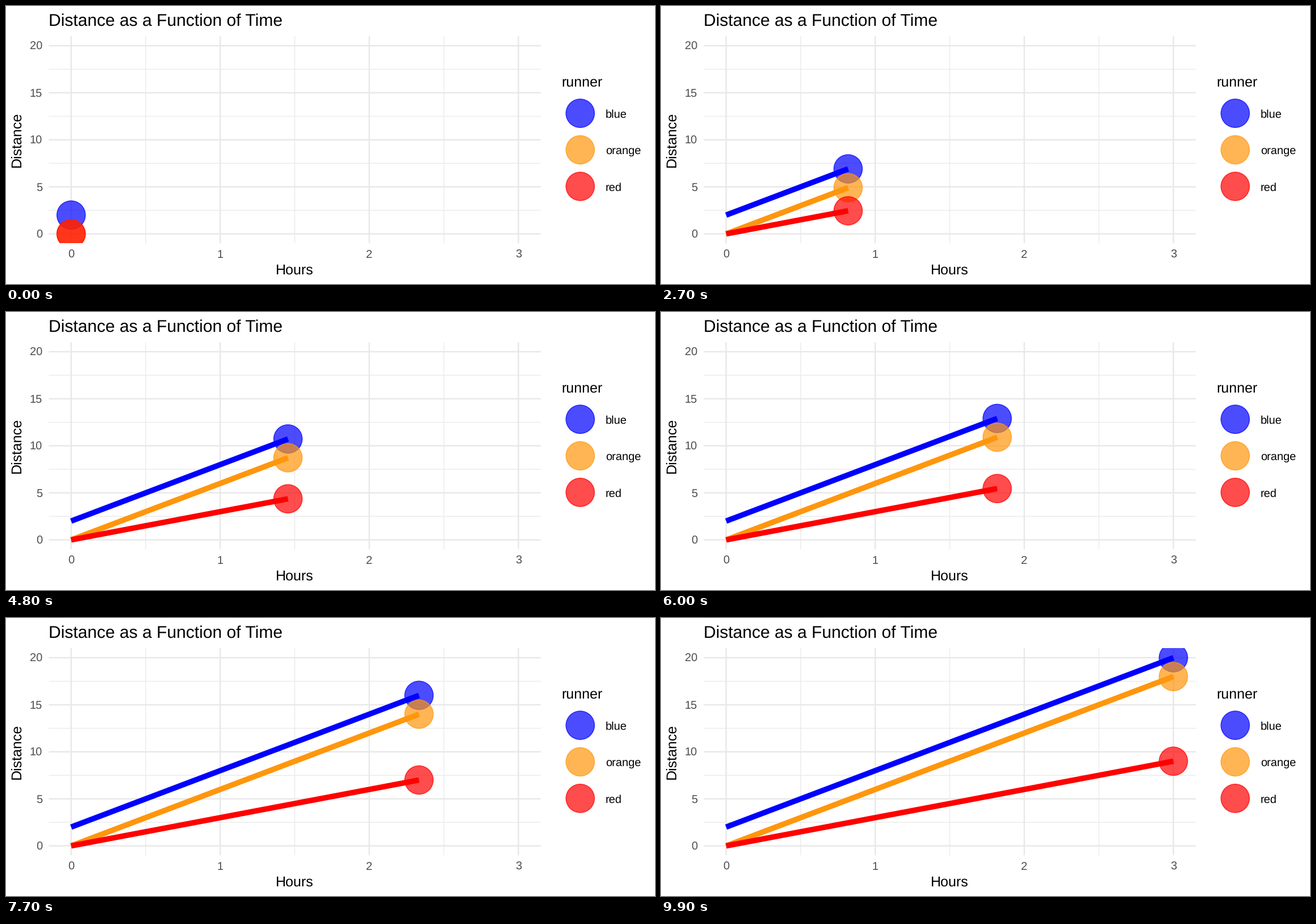
Recreate the animation shown at these times as a matplotlib script. Size 1143 by 490 pixels, loop 10 s.

```python
import matplotlib.pyplot as plt
from matplotlib.animation import FuncAnimation
from matplotlib.lines import Line2D
from matplotlib.patches import Circle, Rectangle

W, H, DPI = 1143, 490, 64
PT = 72 / DPI  # points per pixel
FRAMES, INTERVAL = 100, 100
HOURS = 3

LEFT, RIGHT, TOP, BOTTOM = 75.3, 941.8, 53.4, 418.2
RADIUS, EDGE, TRAIL = 25.05, 1.6, 9.7
BLUE, ORANGE, RED = "#0000ff", "#ff960c", "#ff0000"
# name, colour, start distance, speed
RUNNERS = [("blue", BLUE, 2, 6), ("orange", ORANGE, 0, 6), ("red", RED, 0, 3)]

plt.rcParams["font.family"] = "Liberation Sans"
plt.rcParams["text.hinting"] = "none"

fig = plt.figure(figsize=(W / DPI, H / DPI), dpi=DPI, facecolor="white")
ax = fig.add_axes([0, 0, 1, 1])
ax.set_xlim(0, W)
ax.set_ylim(H, 0)
ax.axis("off")
panel = Rectangle((LEFT, TOP), RIGHT - LEFT, BOTTOM - TOP, fc="none", ec="none")
ax.add_patch(panel)


def px(hours):
    return 114.7 + 262.57 * hours


def py(distance):
    return 401.65 - 16.58 * distance


def line(xs, ys, color, width, z):
    item = Line2D(xs, ys, color=color, lw=width * PT, zorder=z,
                  solid_capstyle="butt", snap=False)
    ax.add_line(item)
    return item


def dot(x, y, color, z):
    item = Circle((x, y), RADIUS, fc=color, ec=color, lw=EDGE * PT,
                  alpha=0.7, zorder=z)
    ax.add_patch(item)
    return item


def label(x, y, text, size, color="black", ha="left", **kw):
    ax.text(x, y, text, fontsize=size * PT, color=color, ha=ha,
            va="baseline", **kw)


def grid(xs, ys, width, z):
    for x in xs:
        line([px(x)] * 2, [TOP, BOTTOM], "#e8e8e8", width, z)
    for y in ys:
        line([LEFT, RIGHT], [py(y)] * 2, "#e8e8e8", width, z)


grid([0.5, 1.5, 2.5], [2.5, 7.5, 12.5, 17.5], 1.2, 1)
grid(range(4), range(0, 21, 5), 2.4, 2)

for h in range(4):
    label(px(h), 444, str(h), 20, "#4d4d4d", "center")
for d in range(0, 21, 5):
    label(64, py(d) + 7.2, str(d), 20, "#4d4d4d", "right")

label(LEFT, 35.3, "Distance as a Function of Time", 30)
label((LEFT + RIGHT) / 2, 472.5, "Hours", 25, ha="center")
ax.text(30.6, (TOP + BOTTOM) / 2, "Distance", fontsize=25 * PT, rotation=90,
        ha="right", va="center")
label(978.8, 142, "runner", 25)

dots, trails = [], []
for i, (name, color, start, speed) in enumerate(RUNNERS):
    y = 189.1 + 64.4 * i
    dot(1011.3, y, color, 3)
    label(1055.7, y + 7.5, name, 20)
    dots.append(dot(px(0), py(start), color, 4 + i))
    trails.append(line([], [], color, TRAIL, 8 + i))
    dots[-1].set_clip_path(panel)
    trails[-1].set_clip_path(panel)


def draw(i):
    t = HOURS * i / (FRAMES - 1)
    for d, trail, (_, _, start, speed) in zip(dots, trails, RUNNERS):
        x, y = px(t), py(start + speed * t)
        d.center = x, y
        trail.set_data([px(0), x], [py(start), y])
        trail.set_visible(i > 0)
    return dots + trails


anim = FuncAnimation(fig, draw, frames=FRAMES, interval=INTERVAL,
                     init_func=lambda: draw(0), repeat=True, repeat_delay=0,
                     blit=False)
plt.show()
```
